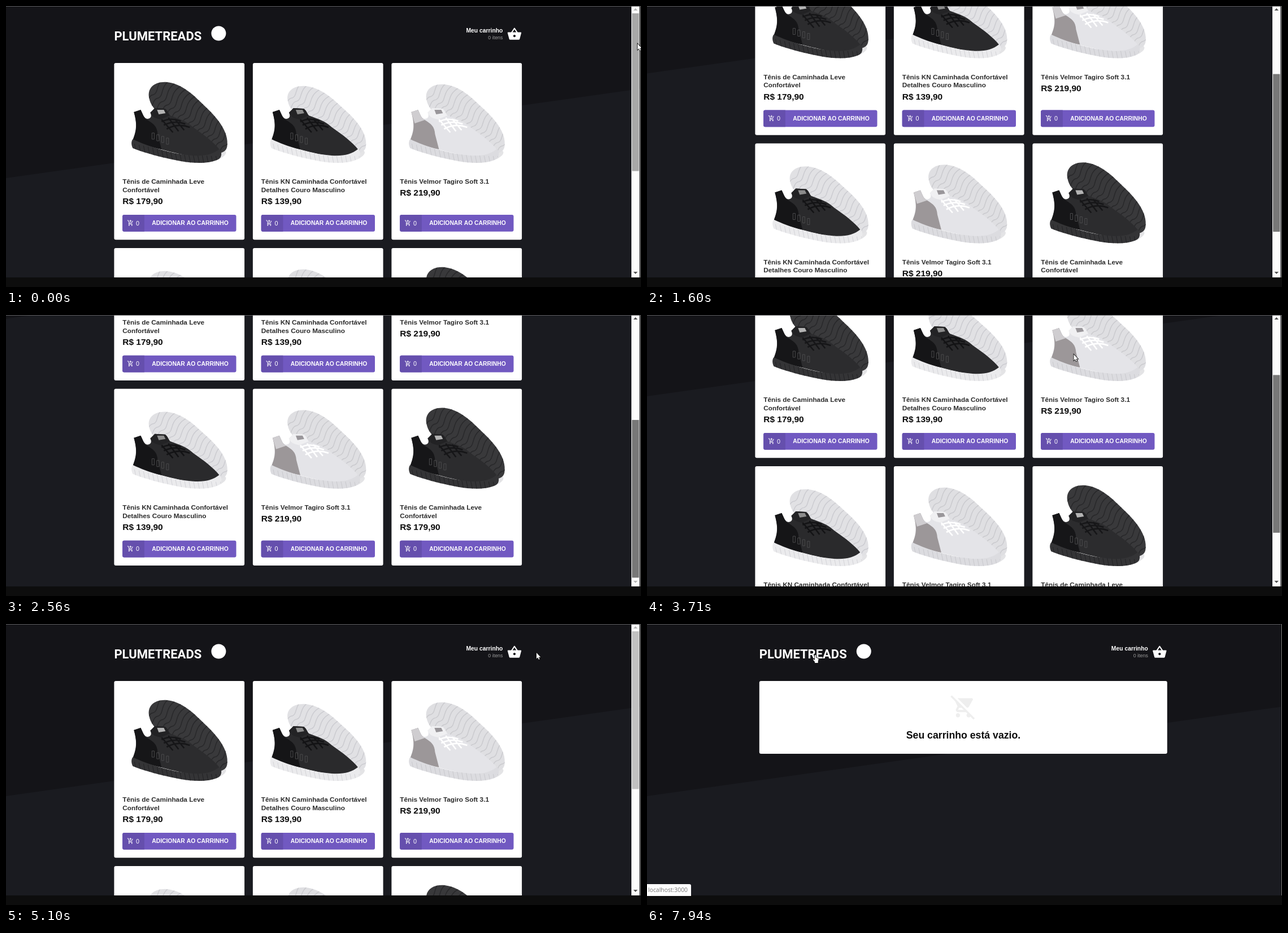
Recreate the animation shown at these times as an HTML page with a canvas. Size 1124x498 px, loop 8000 ms.

```html
<!DOCTYPE html>
<html lang="pt-BR">
<head>
<meta charset="utf-8">
<title>Loja de tênis</title>
<style>
html, body { margin: 0; width: 100%; height: 100%; overflow: hidden; background: #0c0c0c; }
canvas { display: block; width: 1124px; height: 498px; }
</style>
</head>
<body>
<canvas id="stage" width="1124" height="498"></canvas>
<script>
const ctx = document.getElementById('stage').getContext('2d');
const LOOP = 8000, VIEW_H = 481, MAX_SCROLL = 298.3;
const ARIAL = '"Liberation Sans", Arial, sans-serif';

const TICKS = [0, 120, 330, 530, 740, 940, 1160, 1360, 1600, 1860, 2090, 2320, 2560,
  3490, 3710, 3930, 4170, 4420, 4610, 4780, 4940, 5100, 5240, 5440, 5640, 5790,
  6870, 7030, 7180, 7340, 7500, 7650, 7810, 7940];

const SCROLL = [[0, 0], [120, 4], [530, 34], [940, 81.5], [1600, 185.5], [2090, 262],
  [2320, 290], [2560, MAX_SCROLL], [3380, MAX_SCROLL], [3710, 161], [3930, 85],
  [4170, 32], [4420, 6], [4610, 0]];
const POINTER_X = [[4610, 1112], [5100, 939], [5240, 908], [5440, 900], [6713, 900], [7810, 298]];
const POINTER_Y = [[4610, 66], [5100, 51], [5240, 49], [5440, 48], [6713, 48], [7810, 54.5]];

const ICON = {
  basket: new Path2D('M17.21 9l-4.38-6.56c-.19-.28-.51-.42-.83-.42-.32 0-.64.14-.83.43L6.79 9H2c-.55 0-1 .45-1 1 0 .09.01.18.04.27l2.54 9.27c.23.84 1 1.46 1.92 1.46h13c.92 0 1.69-.62 1.93-1.46l2.54-9.27L23 10c0-.55-.45-1-1-1h-4.79zM9 9l3-4.4L15 9H9zm3 8c-1.1 0-2-.9-2-2s.9-2 2-2 2 .9 2 2-.9 2-2 2z'),
  add: new Path2D('M11 9h2V6h3V4h-3V1h-2v3H8v2h3v3zm-4 9c-1.1 0-1.99.9-1.99 2S5.9 22 7 22s2-.9 2-2-.9-2-2-2zm10 0c-1.1 0-1.99.9-1.99 2s.89 2 1.99 2 2-.9 2-2-.9-2-2-2zm-9.83-3.25l.03-.12.9-1.63h7.45c.75 0 1.41-.41 1.75-1.03l3.86-7.01L19.42 4h-.01l-1.1 2-2.76 5H8.53l-.13-.27L6.16 6l-.95-2-.94-2H1v2h2l3.6 7.59-1.35 2.45c-.16.28-.25.61-.25.96 0 1.1.9 2 2 2h12v-2H7.42c-.13 0-.25-.11-.25-.25z'),
  empty: new Path2D('M22.73 22.73L2.77 2.77 2 2l-.73-.73L0 2.54l4.39 4.39 2.21 4.66-1.35 2.45c-.16.28-.25.61-.25.96 0 1.1.9 2 2 2h7.46l1.38 1.38c-.5.36-.83.95-.83 1.62 0 1.1.89 2 1.99 2 .67 0 1.26-.33 1.62-.84L21.46 24l1.27-1.27zM7.42 15c-.14 0-.25-.11-.25-.25l.03-.12.9-1.63h2.36l2 2H7.42zm8.13-2c.75 0 1.41-.41 1.75-1.03l3.58-6.49c.08-.14.12-.31.12-.48 0-.55-.45-1-1-1H6.54l9.01 9zM7 18c-1.1 0-1.99.9-1.99 2S5.9 22 7 22s2-.9 2-2-.9-2-2-2z'),
  arrow: new Path2D('M0 0V10.5L2.4 8.3 4 12 5.6 11.3 4 7.8H7.3Z'),
  hand: new Path2D('M-1 1Q0-.6 1.1 1V5.3L4.6 6.2Q5.8 6.6 5.6 8.2L4.7 12V14.6H-1V12.6L-3.8 9.2Q-4 7.6-2.6 8L-1 9.4Z')
};

const SHOE = {
  back: new Path2D('M62 62C58 44 72 32 94 34C120 37 140 56 158 74C182 96 204 122 200 148C198 160 184 162 172 158L110 130L84 92C72 84 64 74 62 62Z'),
  upper: new Path2D('M35 87L47 83C51 90 53 99 59 99C67 98 66 92 64 88L72 80L90 81C95 84 96 90 99 93C118 100 128 103 140 114C160 128 176 140 187 154C184 164 160 170 130 164C90 156 55 146 33 137C38 122 42 112 35 87Z'),
  heel: new Path2D('M35 87L47 83C51 92 53 99 59 101C70 108 76 112 77 126L84 153C65 149 46 143 33 137C39 122 42 112 35 87Z'),
  tongue: new Path2D('M64 88L72 80L90 81C95 84 96 90 99 93L82 100C76 98 68 98 64 88Z'),
  sole: new Path2D('M33 135C60 148 100 160 130 163C155 166 172 164 187 152C192 160 190 168 184 171C168 179 140 178 118 174C85 168 50 158 33 151C30 145 30 139 33 135Z'),
  laces: new Path2D('M84 104Q100 96 118 103M88 110Q106 101 126 108M93 117Q112 106 134 114M84 100L104 123M96 97L114 121M107 99L124 119')
};

const black = {
  title: ['Tênis de Caminhada Leve', 'Confortável'], price: 'R$ 179,90', squash: 1,
  back: '#39393b', rib: '#28282a', upper: '#2c2c2e', heel: '#161618', tongue: '#222224',
  sole: '#343436', groove: '#242426', laces: '#161618', tab: '#4a4a4c', label: '#b4b4b4'
};
const mixed = {
  title: ['Tênis KN Caminhada Confortável', 'Detalhes Couro Masculino'], price: 'R$ 139,90', squash: .944,
  back: '#e1e1e4', rib: '#cbcbd0', upper: '#2a2a2c', heel: '#151517', tongue: '#232325',
  sole: '#ebebed', groove: '#d5d5d9', laces: '#131315', tab: '#4a4a4c', label: '#8c8c8c'
};
const grey = {
  title: ['Tênis Velmor Tagiro Soft 3.1'], price: 'R$ 219,90', squash: .968,
  back: '#dfdfe2', rib: '#cacace', upper: '#e4e4e8', heel: '#9c9799', tongue: '#f0f0f2',
  sole: '#dcdce0', groove: '#cacace', laces: '#ffffff', tab: '#a9a5a7', label: '#99969a'
};
const PRODUCTS = [black, mixed, grey, mixed, grey, black];

function at(keys, t) {
  if (t <= keys[0][0]) return keys[0][1];
  for (let i = 1; i < keys.length; i++) {
    const [t0, a] = keys[i - 1], [t1, b] = keys[i];
    if (t <= t1) return a + (b - a) * (t - t0) / (t1 - t0);
  }
  return keys[keys.length - 1][1];
}

function rect(x, y, w, h, color) {
  ctx.fillStyle = color;
  ctx.fillRect(x, y, w, h);
}

function round(x, y, w, h, r, color) {
  ctx.fillStyle = color;
  ctx.beginPath();
  ctx.roundRect(x, y, w, h, r);
  ctx.fill();
}

function text(str, x, y, font, color, align = 'left') {
  ctx.font = font;
  ctx.fillStyle = color;
  ctx.textAlign = align;
  ctx.fillText(str, x, y);
}

function icon(path, x, y, scale, color) {
  ctx.save();
  ctx.translate(x, y);
  ctx.scale(scale, scale);
  ctx.fillStyle = color;
  ctx.fill(path);
  ctx.restore();
}

function fill(path, color) {
  ctx.fillStyle = color;
  ctx.fill(path);
}

function stroke(path, color, width) {
  ctx.strokeStyle = color;
  ctx.lineWidth = width;
  ctx.stroke(path);
}

function drawBackSole(p) {
  ctx.save();
  ctx.translate(0, 160 * (1 - p.squash));
  ctx.scale(1, p.squash);
  fill(SHOE.back, p.back);
  ctx.clip(SHOE.back);
  const ribs = new Path2D();
  for (let i = 0; i < 17; i++) {
    const x = 58 + i * 8.5, y = 56 + i * 6;
    ribs.moveTo(x - 14, y + 26);
    ribs.bezierCurveTo(x + 6, y + 22, x - 2, y + 2, x + 12, y);
    ribs.bezierCurveTo(x + 22, y - 4, x + 14, y - 22, x + 36, y - 34);
  }
  stroke(ribs, p.rib, 1.5);
  ctx.restore();
}

function drawShoes(p) {
  ctx.fillStyle = '#e4e4e6';
  ctx.beginPath();
  ctx.ellipse(180, 164, 19, 8, -.35, 0, 7);
  ctx.fill();
  drawBackSole(p);
  fill(SHOE.upper, p.upper);
  fill(SHOE.heel, p.heel);
  fill(SHOE.tongue, p.tongue);
  if (p === grey) {
    const patch = new Path2D('M35 87L47 83C51 92 53 99 59 101L41 107Z');
    fill(patch, '#cfcdd0');
  }
  fill(new Path2D('M76 83L88 83L91 89L79 91Z'), p.label);
  stroke(SHOE.laces, p.laces, 2.6);
  if (p !== grey) {
    const tabs = new Path2D();
    for (let i = 0; i < 4; i++) {
      tabs.rect(67 + i * 8.5, 124 + i * 3, 4, 11);
    }
    stroke(tabs, p.tab, 1);
  }
  fill(SHOE.sole, p.sole);
  ctx.save();
  ctx.clip(SHOE.sole);
  const grooves = new Path2D();
  for (let x = 36; x < 190; x += 8) {
    const y = 150 + 22 * Math.sin((x - 36) / 95);
    grooves.moveTo(x, y - 7);
    grooves.lineTo(x + 4, y + 12);
  }
  stroke(grooves, p.groove, 1.1);
  ctx.restore();
}

function drawCard(p, x, y) {
  if (y > VIEW_H || y < -314) return;
  ctx.save();
  ctx.translate(x, y);
  round(0, 0, 230.7, 313.3, 3, '#ffffff');
  drawShoes(p);
  p.title.forEach((line, i) => text(line, 14.8, 214 + i * 14.8, 'bold 11.8px ' + ARIAL, '#2c2c2c'));
  text(p.price, 14.8, 235.3 + (p.title.length - 1) * 14.8, 'bold 15.5px ' + ARIAL, '#0c0c0c');
  round(14.8, 269, 201.3, 29.8, 3, '#7159c1');
  round(14.8, 269, 38.7, 29.8, [3, 0, 0, 3], '#654fad');
  icon(ICON.add, 23, 277.6, .492, '#fff');
  text('0', 38.6, 287.6, '10.8px ' + ARIAL, '#fff');
  text('ADICIONAR AO CARRINHO', 66.8, 287.4, 'bold 10.35px ' + ARIAL, '#fff');
  ctx.restore();
}

function drawBackdrop(scroll, width) {
  rect(0, 0, width, VIEW_H, '#141418');
  ctx.fillStyle = '#1a1b20';
  ctx.beginPath();
  ctx.moveTo(0, 305 - scroll);
  ctx.lineTo(1124, 146.5 - scroll);
  ctx.lineTo(1124, VIEW_H);
  ctx.lineTo(0, VIEW_H);
  ctx.fill();
}

function drawHeader(x, y, hovered) {
  ctx.save();
  ctx.translate(x, y);
  text('PLUMETREADS', 0, 61, 'bold 22px Roboto, sans-serif', '#fff');
  ctx.fillStyle = '#fff';
  ctx.beginPath();
  ctx.arc(185, 48.5, 13, 0, 7);
  ctx.fill();
  ctx.globalAlpha = hovered ? .7 : 1;
  text('Meu carrinho', 688, 46.8, 'bold 10.35px ' + ARIAL, '#fff', 'right');
  text('0 itens', 688, 59, '8.85px ' + ARIAL, '#999', 'right');
  icon(ICON.basket, 695.3, 36.5, 1.107, '#fff');
  ctx.restore();
}

function triangle(y, dir, color) {
  ctx.fillStyle = color;
  ctx.beginPath();
  ctx.moveTo(1110.5, y);
  ctx.lineTo(1118, y);
  ctx.lineTo(1114.2, y + 4 * dir);
  ctx.fill();
}

function drawScrollbar(scroll, t) {
  const pressed = t >= 120 && t < 4610;
  const hovered = t < 120 || (t >= 4610 && t < 4780);
  rect(1107, 0, 14.5, VIEW_H, '#fcfcfc');
  triangle(8, -1, scroll > 0 ? '#505050' : '#b5b5b5');
  triangle(471, 1, scroll < MAX_SCROLL ? '#505050' : '#b5b5b5');
  rect(1108, 13 + scroll * .58, 12.5, 279.5, pressed ? '#787878' : hovered ? '#a8a8a8' : '#c1c1c1');
}

function drawShop(t, hovered) {
  const scroll = at(SCROLL, t);
  drawBackdrop(scroll, 1107);
  drawHeader(191.4, -scroll, hovered);
  PRODUCTS.forEach((p, i) =>
    drawCard(p, 191.4 + (i % 3) * 245.5, 101 + Math.floor(i / 3) * 328 - scroll));
  drawScrollbar(scroll, t);
}

function drawCart(hovered) {
  drawBackdrop(0, 1122);
  drawHeader(198.8, 0, hovered);
  round(198.8, 101, 722, 129, 3, '#ffffff');
  icon(ICON.empty, 537.2, 124, 1.89, '#eeeeee');
  text('Seu carrinho está vazio.', 560, 203, 'bold 17.7px ' + ARIAL, '#0c0c0c', 'center');
}

function drawStatus(url, width) {
  round(0, 461, width, 21, [0, 3, 0, 0], '#ffffff');
  text(url, 2, 475, '10.4px "Open Sans", sans-serif', '#767676');
}

function drawPointer(shape, x, y) {
  ctx.save();
  ctx.translate(x, y);
  stroke(shape, '#111', 1.6);
  fill(shape, '#fff');
  ctx.restore();
}

function draw(now) {
  const clock = now % LOOP;
  const t = TICKS.filter(tick => tick <= clock).pop();
  const overCart = t >= 5240 && t < 6870;

  rect(0, 0, 1124, 498, '#0d0d0d');
  ctx.save();
  ctx.beginPath();
  ctx.rect(0, 0, 1122, VIEW_H);
  ctx.clip();
  if (t < 5790) drawShop(t, overCart); else drawCart(overCart);
  ctx.restore();
  rect(0, 0, 1122, 1, '#5c5c5e');
  rect(1123, 0, 1, VIEW_H, '#808080');

  if (t >= 5440 && t < 6870) drawStatus('localhost:3000/cart', 102);
  if (t >= 7810) drawStatus('localhost:3000', 78);

  if (t < 120) drawPointer(ICON.arrow, 1118, 67);
  else if (t >= 3710 && t < 3930) drawPointer(ICON.arrow, 755.5, 70);
  else if (t >= 4610) {
    const shape = overCart || t >= 7940 ? ICON.hand : ICON.arrow;
    drawPointer(shape, at(POINTER_X, t), at(POINTER_Y, t));
  }
}

const start = performance.now();
function frame() {
  draw(performance.now() - start);
  requestAnimationFrame(frame);
}
frame();
</script>
</body>
</html>
```
